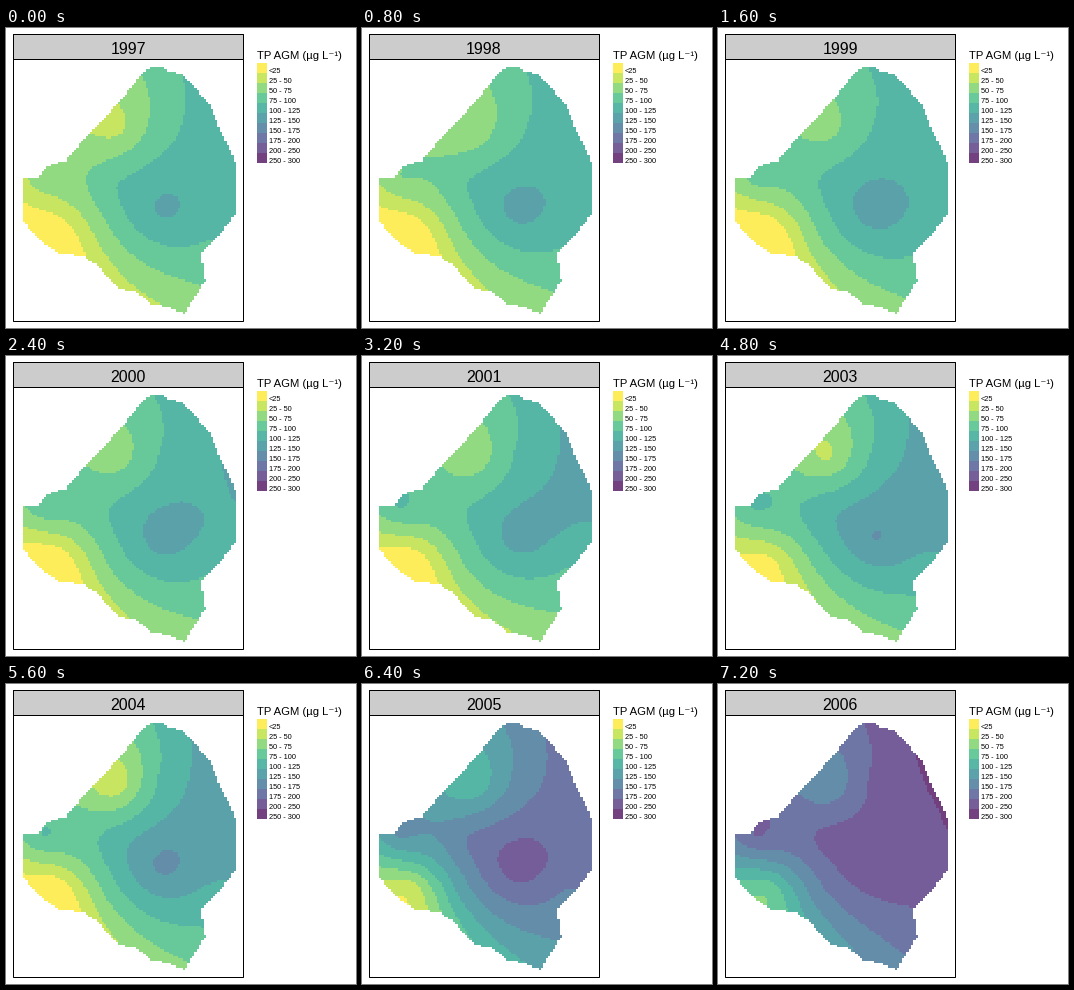
Recreate the animation shown at these times as a matplotlib script. Size 350 by 300 pixels, loop 8 s.

```python
import matplotlib.pyplot as plt
import numpy as np
from matplotlib.animation import FuncAnimation
from matplotlib.colors import ListedColormap
from matplotlib.patches import Rectangle
from matplotlib.path import Path

W, H, DPI = 350, 300, 100
PIXEL = 72 / DPI
FONT = ["Liberation Sans", "DejaVu Sans"]

# Viridis from light to dark, washed out over white
ALPHA = 0.75
COLORS = plt.get_cmap("viridis")(np.linspace(1, 0, 10))[:, :3] * ALPHA + 1 - ALPHA
LIMITS = [*range(25, 201, 25), 250, 300]
LABELS = ["<25"] + [f"{a} - {b}" for a, b in zip(LIMITS, LIMITS[1:])]

# Map raster
LEFT, RIGHT, TOP, BOTTOM = 17, 230, 39, 286
COLS, ROWS = 92, 107

# Key points of the shore, clockwise from the west
SHORE = [
    (17, 151), (33, 149), (37, 142), (47, 136), (60, 133), (66, 125), (80, 109),
    (103, 85), (117, 70), (128, 56), (134, 48), (145, 39), (157, 39), (162, 43),
    (176, 46), (189, 60), (204, 77), (208, 88), (217, 108), (229, 133), (230, 185),
    (212, 209), (195, 226), (199, 253), (188, 270), (179, 286), (162, 279),
    (146, 276), (130, 264), (112, 260), (103, 250), (90, 236), (76, 228), (52, 225),
    (36, 214), (24, 202), (17, 192)]

# Sampling stations, and their levels per year in units of one colour band
STATIONS = np.array([
    (50, 205), (38, 152), (110, 100), (150, 45), (155, 95), (107, 155),
    (157, 182), (200, 137), (205, 212), (178, 278), (100, 215)]) / 100
READINGS = {
    1997: [-0.1, 2.6, 1.65, 3.4, 3.5, 3.9, 5.2, 4.5, 4.0, 2.3, 2.4],
    1999: [-0.3, 3.3, 2.6, 3.95, 4.0, 4.2, 5.6, 4.6, 4.2, 2.7, 2.75],
    2001: [0.0, 4.05, 2.2, 4.0, 4.1, 4.05, 5.5, 5.15, 4.0, 2.3, 2.75],
    2002: [1.2, 4.25, 2.3, 4.0, 4.0, 5.0, 5.8, 5.6, 4.5, 2.75, 3.2],
    2004: [0.0, 4.05, 1.3, 4.05, 4.2, 4.5, 6.3, 5.4, 4.6, 2.95, 2.95],
    2005: [1.3, 6.15, 4.1, 6.2, 6.3, 7.1, 8.65, 7.5, 6.8, 5.3, 5.1],
    2006: [3.2, 8.05, 6.1, 8.05, 8.2, 8.3, 8.8, 8.7, 8.2, 6.7, 6.4],
}
YEARS = range(1997, 2007)

xs = LEFT + (np.arange(COLS) + 0.5) * (RIGHT - LEFT) / COLS
ys = TOP + (np.arange(ROWS) + 0.5) * (BOTTOM - TOP) / ROWS
cells = np.stack(np.meshgrid(xs, ys), axis=-1).reshape(-1, 2)
outside = ~Path(SHORE).contains_points(cells)


def basis(points):
    """Radial kernel around every station, plus a plane."""
    r = np.linalg.norm(points[:, None] - STATIONS, axis=-1)
    return np.column_stack([r ** 1.3, np.ones(len(points)), points])


n = len(STATIONS)
at_stations = basis(STATIONS)
system = np.vstack([at_stations, np.zeros((3, n + 3))])
system[n:, :n] = at_stations[:, n:].T
at_cells = basis(cells / 100)


def levels(year):
    """Readings of a year; gaps take the mean of the years around them."""
    if year in READINGS:
        return np.array(READINGS[year])
    return (levels(year - 1) + levels(year + 1)) / 2


def bands(year):
    weights = np.linalg.solve(system, np.append(levels(year), [0, 0, 0]))
    index = np.clip(np.floor(at_cells @ weights), 0, 9)
    return np.ma.array(index, mask=outside).reshape(ROWS, COLS)


fig = plt.figure(figsize=(W / DPI, H / DPI), dpi=DPI, facecolor="white")
ax = fig.add_axes([0, 0, 1, 1])


def label(x, y, text, px, **kw):
    return ax.text(x, y, text, fontsize=px * PIXEL, family=FONT, color="black",
                   va="baseline", **kw)


def box(x, y, w, h, **kw):
    ax.add_patch(Rectangle((x, y), w, h, **kw))


lake = ax.imshow(bands(YEARS[0]), cmap=ListedColormap(COLORS), vmin=-0.5, vmax=9.5,
                 extent=(LEFT, RIGHT, BOTTOM, TOP), interpolation="nearest",
                 aspect="auto")
ax.set_xlim(0, W)
ax.set_ylim(H, 0)
ax.axis("off")

# Panel and its title strip
box(7, 6, 230, 287, fc="none", ec="black", lw=PIXEL)
box(7, 6, 230, 25, fc="#cccccc", ec="black", lw=PIXEL)
title = label(122, 26, str(YEARS[0]), 16, ha="center")

# Legend
label(251, 31, "TP AGM (µg L⁻¹)", 11.2)
for i, (color, text) in enumerate(zip(COLORS, LABELS)):
    box(251, 35 + 10 * i, 10, 10, fc=color, ec="none", antialiased=False)
    label(263, 45 + 10 * i, text, 7.4)


def draw(i):
    lake.set_data(bands(YEARS[i]))
    title.set_text(str(YEARS[i]))
    return lake, title


anim = FuncAnimation(fig, draw, frames=len(YEARS), interval=800,
                     repeat=True, repeat_delay=0)
plt.show()
```
